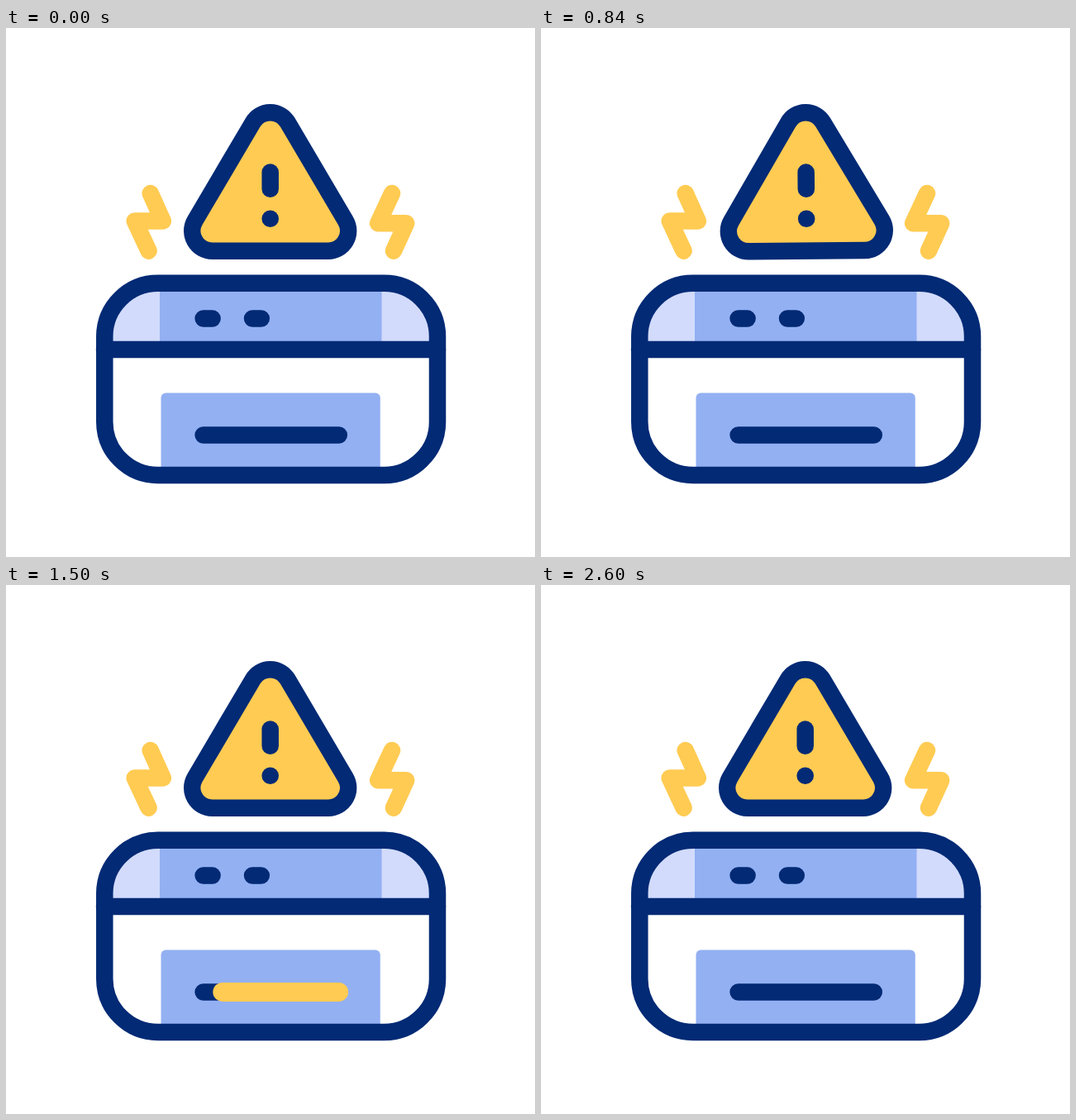
Animation of 640x640 px, one loop 3 s. Source, as an HTML page:

```html
<!DOCTYPE html>
<html lang="en">
<head>
<meta charset="utf-8">
<title>Printer warning</title>
<style>
  html, body { margin: 0; width: 100%; height: 100%; overflow: hidden; background: #fff; }
  svg { display: block; width: 100%; height: 100%; }
  .line { fill: none; stroke: #022a75; stroke-width: 20.5; stroke-linecap: round; stroke-linejoin: round; }
  .bolt { stroke: #ffcb52; }
  .glow { stroke-width: 23; visibility: hidden; }
  .red { stroke: #ff6152; }
  .gold { stroke: #ffcb52; }
</style>
</head>
<body>
<svg viewBox="0 0 640 640">
  <clipPath id="body"><rect x="119.3" y="308.8" width="402.7" height="232.2" rx="64.5"/></clipPath>

  <g clip-path="url(#body)">
    <path fill="#d2dbfc" d="M119 308H522V389H119Z"/>
    <path fill="#93b0f2" d="M186 308H454.5V389H186Z"/>
    <rect x="187.5" y="441.5" width="265.3" height="110" rx="6" fill="#93b0f2"/>
  </g>
  <rect class="line" x="119.3" y="308.8" width="402.7" height="232.2" rx="64.5"/>
  <path class="line" d="M119 389H522"/>
  <path class="line" d="M238.6 351.5H249.6M298 351.5H308.8M238.6 492.4H402.8"/>

  <path class="line glow gold" data-part="feed" d="M238.6 492.4H402.8"/>
  <path class="line glow gold" data-part="keys" d="M238.6 351.5H249.8"/>
  <path class="line glow gold" data-part="keys" d="M297.3 351.5H308.8"/>

  <path class="line bolt" d="M174.7 200L189.8 233.5H155.7L172.6 269.6"/>
  <path class="line bolt" d="M467 200L450.1 236.3H484.2L469 269.6"/>
  <path class="line glow red" data-part="bolts" d="M172.6 269.6L155.7 233.5H189.8L174.7 200"/>
  <path class="line glow red" data-part="bolts" d="M469 269.6L484.2 236.3H450.1L467 200"/>

  <g id="sign">
    <path class="line" style="fill:#ffcb52" d="M228.6 233.1L298.8 114.1A24.3 24.3 0 0 1 340.6 114.1L410.8 233.1A24.3 24.3 0 0 1 389.9 269.7H249.5A24.3 24.3 0 0 1 228.6 233.1Z"/>
    <path class="line" d="M319.7 174.5V194.8"/>
    <circle cx="319.7" cy="230.8" r="10.3" fill="#022a75"/>
  </g>
</svg>
<script>
const LOOP = 3000;
const sign = document.getElementById('sign');
const glows = [...document.querySelectorAll('.glow')].map(el => ({
  el, part: el.dataset.part, len: el.getTotalLength()
}));

// each sweep runs along its path: the tail sets off `lag` ms after the head
const sweeps = {
  bolts: { starts: [263, 845], time: 233, lag: 143 },
  feed: { starts: [1062], time: 448, lag: 333 },
  keys: { starts: [1565, 2171], time: 260, lag: 169 }
};

function ease(u) {
  u = Math.min(1, Math.max(0, u));
  return u * u * (3 - 2 * u);
}

function sweep({ starts, time, lag }, t) {
  const s = starts.filter(v => v <= t).pop() ?? LOOP;
  return [ease((t - s - lag) / time), ease((t - s) / time)];
}

function swing(t) {
  const period = 393, n = (t - 260) / period;
  return n > 0 && n < 3 ? -4 * Math.sin(2 * Math.PI * n) : 0;
}

function draw(t) {
  sign.setAttribute('transform', `rotate(${swing(t)} 319.7 75)`);
  for (const { el, part, len } of glows) {
    const [tail, head] = sweep(sweeps[part], t);
    el.style.visibility = head - tail > 0.002 ? 'visible' : 'hidden';
    el.style.strokeDasharray = `${(head - tail) * len} ${len * 2}`;
    el.style.strokeDashoffset = -tail * len;
  }
}

const begin = performance.now();
function tick() {
  draw((performance.now() - begin) % LOOP);
  requestAnimationFrame(tick);
}
tick();
</script>
</body>
</html>
```
